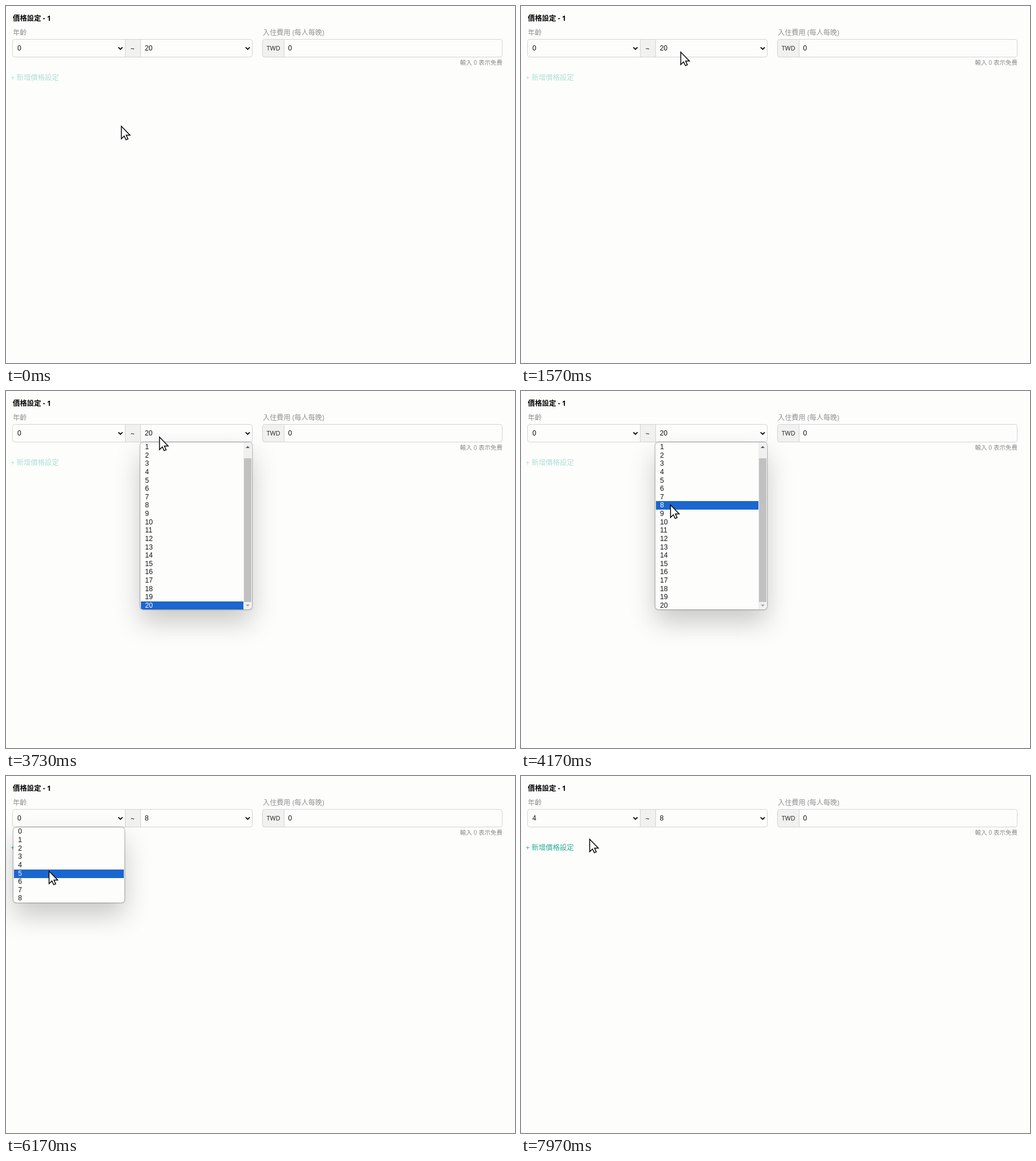
Write an HTML page that moves like this. It is 894 by 626 pixels and loops after 8000 ms.

```html
<!DOCTYPE html>
<html lang="zh-Hant">
<head>
<meta charset="utf-8">
<title>價格設定</title>
<style>
html, body { margin: 0; width: 100%; height: 100%; overflow: hidden; background: #fdfdfc; }
#stage { position: relative; width: 894px; height: 626px; overflow: hidden; }
svg { position: absolute; left: 0; top: 0; overflow: visible; }
text { font: 12.2px "Open Sans", "Noto Sans CJK TC", "Noto Sans CJK JP", sans-serif; fill: #111; white-space: pre; }
.title { font-size: 12.4px; font-weight: 700; fill: #000; }
.label { fill: #929292; }
.note { font-size: 10.5px; fill: #8c8c8c; text-anchor: end; }
.unit { font-size: 10.8px; fill: #222; }
.num, .list { font-family: "Liberation Sans", Arial, sans-serif; font-size: 12.2px; }
#add { font-size: 12.4px; font-weight: 500; fill: #addfd6; }
#add.on { fill: #2dac96; }
.frame { fill: none; stroke: #d3d3d3; }
.addon { fill: #f1f1f0; }
.chev { fill: none; stroke: #111; stroke-width: 1.9; }
.list {
  position: absolute; top: 90px; border-radius: 5px; background: #fdfdfc; color: #111;
  box-shadow: 0 0 1.5px .5px rgba(0,0,0,.5), 0 22px 46px rgba(0,0,0,.21);
}
.rows { position: absolute; inset: 0; overflow: hidden; border-radius: 5px; }
.row { position: absolute; left: 1px; right: 1px; height: 15px; line-height: 14.6px; padding-left: 7.3px; }
.row.on { background: #1b66cf; color: #fff; }
.bar { position: absolute; right: 1px; top: 0; bottom: 0; width: 14px; background: #f0f0f0; z-index: 1; }
.bar i { position: absolute; left: 1px; right: 0; top: 28px; bottom: 13px; background: #c1c1c1; }
</style>
</head>
<body>
<div id="stage">
  <svg width="894" height="626">
    <text class="title" x="12" y="25.6">價格設定 - 1</text>
    <text class="label" x="12" y="51">年齡</text>
    <text class="label" x="451" y="51">入住費用 (每人每晚)</text>

    <rect class="addon" x="209" y="59" width="27" height="31"/>
    <path class="frame" d="M209.5 59V90M236.5 59V90"/>
    <rect class="frame" x="11.5" y="58.5" width="421" height="31" rx="4"/>
    <path class="chev" d="M197.3 72.3l3.7 3.7l3.7-3.7M420.8 72.3l3.7 3.7l3.7-3.7"/>
    <text class="num" id="from" x="20" y="78.4">0</text>
    <text x="218.8" y="80.2">~</text>
    <text class="num" id="to" x="243.7" y="78.4">20</text>

    <rect class="addon" x="451" y="59" width="37" height="31" rx="3"/>
    <path class="frame" d="M488.5 59V90"/>
    <rect class="frame" x="450.5" y="58.5" width="421" height="31" rx="4"/>
    <text class="unit" x="457.8" y="78.4">TWD</text>
    <text class="num" x="495.6" y="78">0</text>
    <text class="note" x="872" y="103">輸入 0 表示免費</text>
    <text id="add" x="8.2" y="129.8">+ 新增價格設定</text>
  </svg>

  <div class="list" id="fromList" style="left:13px;width:195px;height:132px"><div class="rows"></div></div>
  <div class="list" id="toList" style="left:236px;width:196px;height:293px">
    <div class="rows"><div class="bar"><i></i>
      <svg width="14" height="293"><path d="M4 10l3.5-3.5l3.5 3.5Z" fill="#555"/><path d="M4 284.5l3.5 3.5l3.5-3.5Z" fill="#a3a3a3"/></svg>
    </div></div>
  </div>

  <svg id="cursor" width="1" height="1">
    <path id="arrow" d="M.6 .8V22.8L5.6 18L8.8 24.6L12.2 23.1L9.2 16.6H15.8Z" fill="#fff" stroke="#000" stroke-width="1.5"/>
    <g id="blocked">
      <circle r="8.7" fill="#fff"/>
      <g stroke="#000" stroke-width="4.6"><g id="sign"><circle r="8.7" fill="none"/><path d="M-6.1-6.1L6.1 6.1"/></g></g>
      <use href="#sign" stroke="#fff" stroke-width="1.7"/>
    </g>
  </svg>
</div>
<script>
const $ = id => document.getElementById(id);
const LOOP = 8000, ROW = 14.62;
const home = [202, 210];

// each move eases the pointer to a stop, where it rests until the next one
const moves = [
  { from: 30, to: 1130, at: [280, 80] },      // second select
  { from: 1570, to: 2070, at: [79, 126] },    // disabled button
  { from: 2100, to: 2300, at: [56, 126] },
  { from: 2300, to: 2530, at: [79, 126] },
  { from: 2560, to: 2900, at: [66, 124] },
  { from: 2930, to: 3500, at: [269, 80] },    // second select again
  { from: 3730, to: 4170, at: [262, 199] },   // option 8
  { from: 4830, to: 5630, at: [161, 85] },    // first select
  { from: 5700, to: 6500, at: [25, 213] },    // last option
  { from: 6900, to: 7000, at: [36, 199] },
  { from: 7000, to: 7370, at: [33, 156] },    // option 4
  { from: 7870, to: 7970, at: [120, 110] }
];

const ease = u => u * u * (3 - 2 * u);

function pointer(t) {
  let pos = home;
  for (const { from, to, at } of moves) {
    if (t < from) break;
    const u = ease(Math.min(1, (t - from) / (to - from)));
    pos = pos.map((p, k) => p + (at[k] - p) * u);
  }
  return pos;
}

function makeList(id, { first, last, value, top, open, close }) {
  const el = $(id), box = el.firstElementChild, rows = [];
  const left = el.offsetLeft, right = left + el.offsetWidth;
  for (let n = first; n <= last; n++) {
    const row = document.createElement("div");
    row.className = "row";
    row.textContent = n;
    row.style.top = (n - first) * ROW + top - el.offsetTop + "px";
    box.append(row);
    rows.push(row);
  }
  return (t, x, y) => {
    const shown = t >= open && t < close;
    const hit = first + Math.floor((y - top) / ROW);
    const inside = x > left && x < right && hit >= first && hit <= last;
    rows.forEach((row, i) => row.classList.toggle("on", first + i === (inside ? hit : value)));
    el.style.visibility = shown ? "visible" : "hidden";
    return shown;
  };
}

const toTimes = { open: 3730, close: 4830 }, fromTimes = { open: 5700, close: 7870 };
const lists = [
  makeList("toList", { first: 1, last: 20, value: 20, top: 91.1, ...toTimes }),
  makeList("fromList", { first: 0, last: 8, value: 0, top: 90.4, ...fromTimes })
];

function draw(t) {
  const [x, y] = pointer(t);
  const open = lists.map(update => update(t, x, y)).some(Boolean);
  const enabled = t >= toTimes.close;
  $("to").textContent = enabled ? 8 : 20;
  $("from").textContent = t >= fromTimes.close ? 4 : 0;
  $("add").classList.toggle("on", enabled);
  const blocked = !enabled && !open && x > 4 && x < 96 && y > 114 && y < 137;
  $("arrow").style.display = blocked ? "none" : "";
  $("blocked").style.display = blocked ? "" : "none";
  $("cursor").style.transform = `translate(${Math.round(x)}px, ${Math.round(y)}px)`;
}

const start = performance.now();
function tick() {
  draw((performance.now() - start) % LOOP);
  requestAnimationFrame(tick);
}
tick();
</script>
</body>
</html>
```
